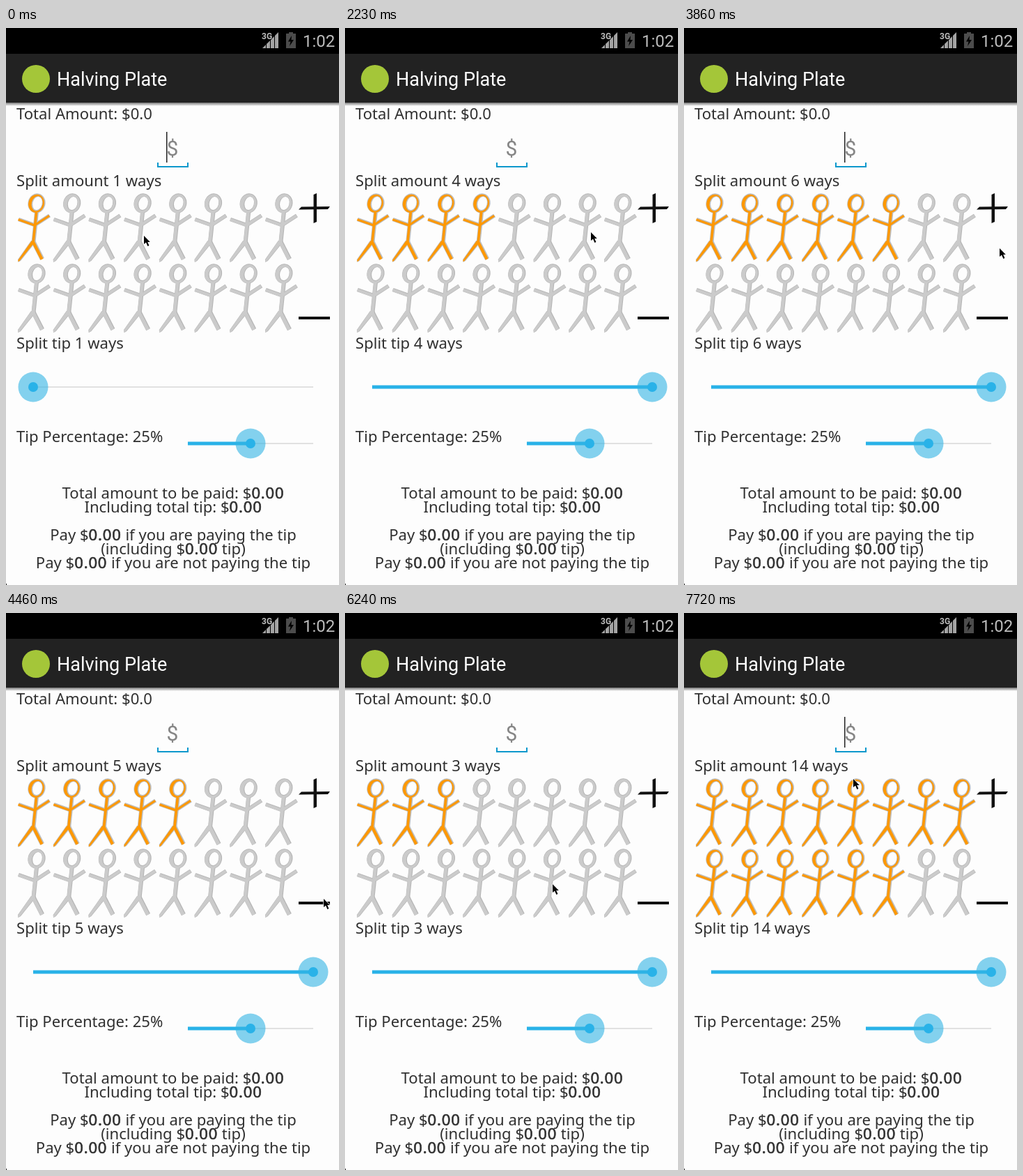
An HTML page with a canvas that plays this animation: 478x799 px, repeating every 8 s.

```html
<!DOCTYPE html>
<html lang="en">
<head>
<meta charset="utf-8">
<title>Halving Plate</title>
<style>
  html, body { margin: 0; width: 478px; height: 799px; overflow: hidden; background: #fdfdfd; }
  canvas { display: block; }
</style>
</head>
<body>
<canvas id="stage" width="478" height="799"></canvas>
<script>
const c = document.getElementById('stage').getContext('2d');
const LOOP = 8000, TICK = 148.5, BLINK = 1007;
const BODY = '22.1px "Noto Sans", sans-serif';
const ROBOTO = 'Roboto, sans-serif';
const INK = '#303030', BLUE = '#29b2e8', FOCUS = '#0c98cc';

// pointer moves: first tick, last tick, x, y reached
const MOVES = [
  [0, 4, 194, 298], [9, 13, 341, 296], [14, 19, 452, 265], [24, 29, 456, 410],
  [33, 37, 98, 321], [38, 42, 298, 389], [44, 47, 407, 340], [48, 52, 243, 238]
];
// tick of each tap, number of people after it
const TAPS = [[0, 1], [7, 4], [21, 5], [23, 6], [30, 5], [32, 4], [33, 3], [44, 14]];

function rect(x, y, w, h, color) {
  c.fillStyle = color;
  c.fillRect(x, y, w, h);
}

function disc(x, y, r, color) {
  c.fillStyle = color;
  c.beginPath();
  c.arc(x, y, r, 0, 7);
  c.fill();
}

function poly(points, color) {
  c.fillStyle = color;
  c.beginPath();
  points.forEach(p => c.lineTo(...p));
  c.closePath();
  c.fill();
}

function line(x1, y1, x2, y2, w, color) {
  c.strokeStyle = color;
  c.lineWidth = w;
  c.beginPath();
  c.moveTo(x1, y1);
  c.lineTo(x2, y2);
  c.stroke();
}

function text(str, x, y, font = BODY, color = INK) {
  c.font = font;
  c.fillStyle = color;
  c.fillText(str, x, y);
}

// centred line, parts between asterisks are slightly heavier
function centred(str, y) {
  const parts = str.split('*');
  const setup = i => { c.font = BODY; c.letterSpacing = i % 2 ? '0.8px' : '0px'; };
  const widths = parts.map((p, i) => { setup(i); return c.measureText(p).width; });
  let x = 240 - widths.reduce((a, b) => a + b, 0) / 2;
  parts.forEach((p, i) => {
    setup(i);
    text(p, x, y);
    if (i % 2) {
      c.strokeStyle = INK;
      c.lineWidth = 0.6;
      c.strokeText(p, x, y);
    }
    x += widths[i];
  });
  c.letterSpacing = '0px';
}

function figure(color, grow) {
  const w = 4 + grow * 2;
  c.fillStyle = color;
  c.beginPath();
  c.ellipse(27, 14.5, 11.5 + grow, 13.3 + grow, 0.25, 0, 7);
  c.ellipse(28, 14.5, 7.7 - grow, 10.6 - grow, 0.25, 0, 7);
  c.fill('evenodd');
  line(27, 27, 22.5, 70, w, color);
  line(1, 37.5, 25, 46, w - 0.5, color);
  line(24, 46, 45.5, 32, w - 0.5, color);
  line(21.5, 68, 35, 94.5, w + 0.5, color);
  poly([[20 - grow, 68], [24 + grow, 71], [3 + grow, 97], [0.5, 98 + grow], [1 - grow, 95]], color);
}

function person(i, active) {
  c.save();
  c.translate(17 + (i % 8) * 50.7, 237 + (i >> 3) * 101);
  figure(active ? '#bebebe' : '#b5b5b5', 1);
  c.translate(-0.4, 0.3);
  figure(active ? '#ff9800' : '#cbcbcb', active ? -0.2 : 0.3);
  c.restore();
}

function slider(x1, x2, y, at) {
  rect(x1, y - 1, x2 - x1, 2, '#e1e1e1');
  rect(x1, y - 2.5, at - x1, 5, BLUE);
  disc(at, y, 21.5, 'rgba(51,181,229,.6)');
  disc(at, y, 7, BLUE);
}

function bars() {
  const shade = c.createLinearGradient(0, 107, 0, 112);
  shade.addColorStop(0, '#777');
  shade.addColorStop(1, '#fdfdfd');
  rect(0, 107, 478, 5, shade);
  rect(0, 0, 478, 37, '#000');
  rect(0, 37, 478, 70, '#222');

  for (let x = 368; x < 390; x += 6) {
    const top = 397 - x;
    poly([[x, 29], [x, top], [x + 5, top - 5], [x + 5, 29]], '#a4a4a4');
  }
  rect(366, 4, 15, 13, '#000');
  text('3G', 367, 16, 'bold 12px ' + ROBOTO, '#bdbdbd');
  rect(406, 6, 6, 3, '#4c4c4c');
  rect(402, 8, 14, 21, '#4c4c4c');
  poly([[410, 11], [405, 19.5], [408.5, 19.5], [407, 26], [413, 17], [409.5, 17]], '#000');
  text('1:02', 426, 27, '24px ' + ROBOTO, '#bcbcbc');

  disc(43, 73, 20, '#a4c639');
  text('Halving Plate', 73, 83, '27px ' + ROBOTO, '#fff');
}

function field(caret) {
  text('$', 230.5, 183, '30px ' + ROBOTO, '#868686');
  rect(217, 198, 45, 2, FOCUS);
  rect(217, 193, 2, 6, FOCUS);
  rect(260, 193, 2, 6, FOCUS);
  if (caret) rect(230, 149, 1.5, 44, '#222');
}

function buttons() {
  poly([[424, 256.5], [465, 256], [462, 260], [420, 260.5]], '#111');
  poly([[441.5, 239], [446, 237], [446, 278], [441.5, 280]], '#111');
  rect(420, 414, 45, 4, '#111');
}

function pointer(x, y) {
  c.save();
  c.translate(x, y);
  c.lineJoin = 'round';
  c.lineWidth = 1.2;
  c.strokeStyle = '#fff';
  poly([[0, 0], [0, 12], [3, 9.6], [5.4, 15], [7.4, 14.1], [5.2, 9], [8.8, 9]], '#000');
  c.stroke();
  c.fill();
  c.restore();
}

function pointerAt(k) {
  let x = 198, y = 298;
  for (const [from, to, toX, toY] of MOVES) {
    const u = Math.min(1, Math.max(0, (k - from) / (to - from)));
    const ease = u * u * (3 - 2 * u);
    x += (toX - x) * ease;
    y += (toY - y) * ease;
  }
  return [Math.round(x), Math.round(y)];
}

function draw(t) {
  const k = Math.floor((t + 6) / TICK);
  const n = TAPS.filter(s => s[0] <= k).pop()[1];
  const caret = (k * TICK + BLINK - 90) % BLINK >= BLINK / 2;

  rect(0, 0, 478, 799, '#fdfdfd');
  bars();
  text('Total Amount: $0.0', 15, 131);
  field(caret);
  text(`Split amount ${n} ways`, 15, 227);
  for (let i = 0; i < 16; i++) person(i, i < n);
  buttons();
  text(`Split tip ${n} ways`, 15, 460);
  slider(39, 441, 515, n > 1 ? 441 : 39);
  text('Tip Percentage: 25%', 15, 594);
  slider(261, 441, 596, 351);
  centred('Total amount to be paid: $*0.00*', 675);
  centred('Including total tip: $*0.00*', 695);
  centred('Pay $*0.00* if you are paying the tip', 735);
  centred('(including $*0.00* tip)', 755);
  centred('Pay $*0.00* if you are not paying the tip', 775);
  rect(0, 797, 1, 2, '#222');
  pointer(...pointerAt(k));
}

const start = performance.now();
function loop() {
  draw((performance.now() - start) % LOOP);
  requestAnimationFrame(loop);
}
loop();
</script>
</body>
</html>
```
